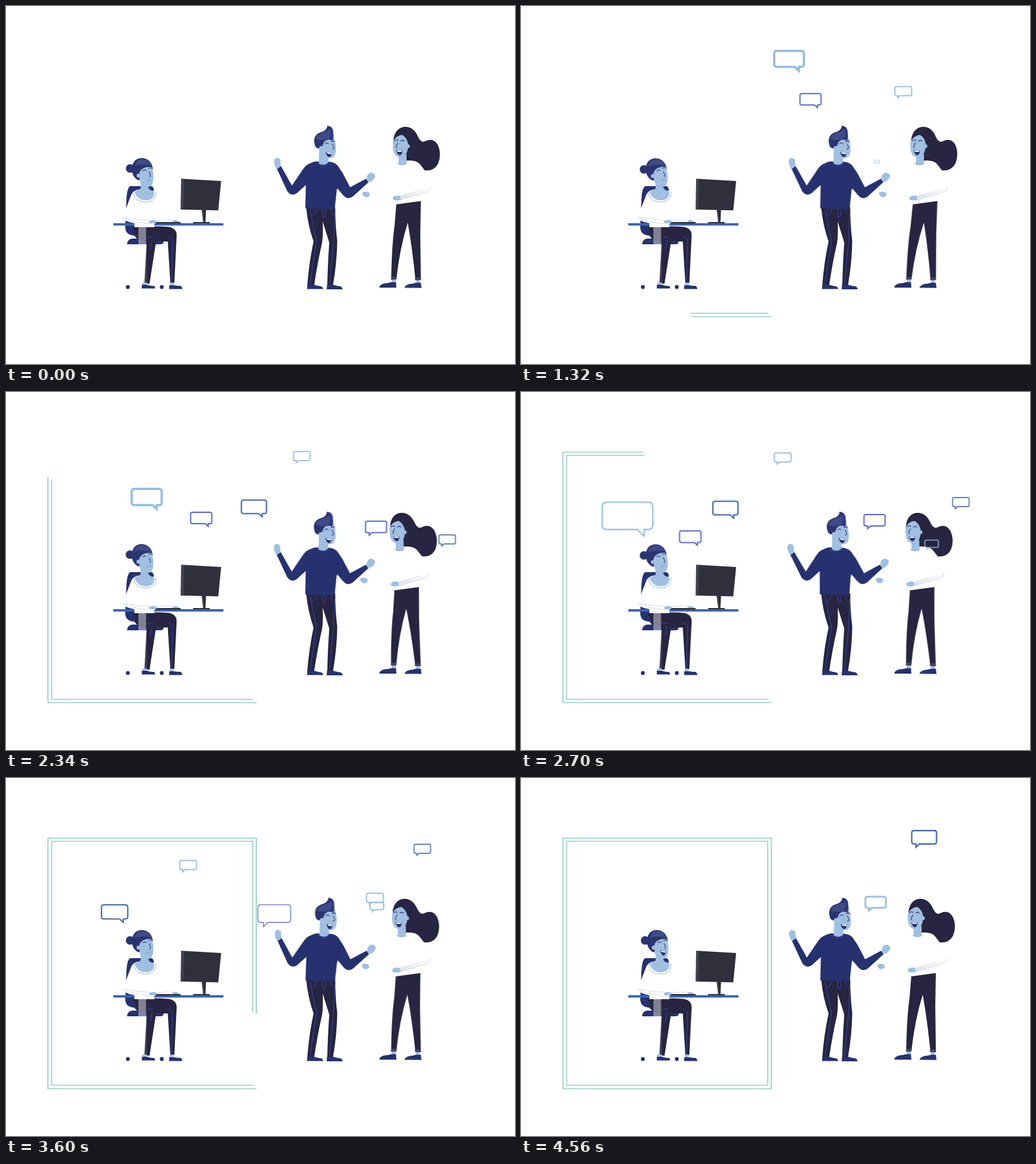
Write an HTML page that moves like this. It is 892 by 628 pixels and loops after 4800 ms.

```html
<!DOCTYPE html>
<html lang="en">
<head>
<meta charset="utf-8">
<title>Office chatter</title>
<style>
  html, body { margin: 0; width: 100%; height: 100%; overflow: hidden; background: #fff; }
  svg { display: block; width: 892px; height: 628px; }
  .skin { fill: #a0bfe1; }
  .navy { fill: #26326f; }
  .dark { fill: #272541; }
  .hair { fill: #2a3570; }
  .shine { fill: #3f4b86; }
  .white { fill: #fff; }
  .line { fill: none; stroke-linecap: round; stroke-linejoin: round; }
  .face { stroke: #29356f; stroke-width: 1.2; }
  .seam { stroke: #3747b4; stroke-width: 1; }
  .fold { stroke: #d3d7e2; stroke-width: 1; }
  .collar { stroke: #8fb0da; stroke-width: 1; }
  .border { fill: none; stroke: #5fb3ac; stroke-width: 1.1; stroke-dasharray: 1612 1700; animation: trace 4.8s linear infinite; }
  #bubbles path { fill: none; }

  #woman { transform-origin: 700px 490px; animation: lean 4.8s ease-out infinite; }
  #man { transform-origin: 552px 385px; animation: rock 4.8s ease-in-out infinite; }
  #head { transform-origin: 244px 320px; animation: nod 4.8s ease-in-out infinite; }
  #smile { animation: smile 4.8s linear infinite; }

  @keyframes trace {
    0% { stroke-dashoffset: 1612px; }
    21.25% { stroke-dashoffset: 1612px; animation-timing-function: steps(13); }
    37.5% { stroke-dashoffset: 1246px; animation-timing-function: steps(10); }
    50% { stroke-dashoffset: 806px; animation-timing-function: steps(13); }
    66.25% { stroke-dashoffset: 440px; animation-timing-function: steps(10); }
    78.75%, 100% { stroke-dashoffset: 0px; }
  }
  @keyframes lean {
    0%, 95%, 100% { transform: skewX(0deg); }
    17.5% { transform: skewX(-1.8deg); animation-timing-function: ease-in-out; }
    47.5% { transform: skewX(1.38deg); }
  }
  @keyframes rock {
    0%, 95%, 100% { transform: skewX(0deg); }
    17.5% { transform: skewX(1.2deg); }
    41.25% { transform: skewX(-1.2deg); }
    56.25% { transform: skewX(1.6deg); }
    75% { transform: skewX(-.6deg); }
  }
  @keyframes nod {
    0%, 17.5%, 75%, 100% { transform: rotate(0deg); }
    27.5%, 56.25% { transform: rotate(-3.4deg); }
    41.25% { transform: rotate(2.3deg); }
  }
  @keyframes smile { 0%, 80% { opacity: 0; } 82.5%, 100% { opacity: 1; } }
</style>
</head>
<body>
<svg viewBox="0 0 892 628">
  <defs>
    <linearGradient id="sleeve">
      <stop offset="0" stop-color="#dfe2ea"/>
      <stop offset="1" stop-color="#fff"/>
    </linearGradient>
  </defs>

  <path class="border" pathLength="1612" d="M439 545H73.500V105.500H438.500V545"/>
  <path class="border" pathLength="1612" d="M433 539H80V111H432.500V539"/>

  <!-- desk worker -->
  <g>
    <path class="navy" d="M218 316Q212 318 211 340L209 388Q209 402 226 403H250L259 324Q259 317 255 316Z"/>
    <path class="navy" d="M212 418Q213 409 221 408H276V415Q275 418 271 418Z"/>
    <rect x="188" y="381" width="193" height="4.200" fill="#3b65b0"/>
    <path class="dark" d="M222 389Q258 385 285 387.500Q300 390 299 404L295 486H288L283.500 413H263L251.500 487H242.500L246.500 413Q221 411 222 389Z"/>
    <path class="line seam" d="M247 406L258 405M256 411L253 428M284 405L291 408M229 404Q224 400 224 393M292 409L290 482"/>
    <path class="white" opacity=".42" d="M232 387H245.500V418H232Z"/>
    <path class="white" opacity=".12" d="M243 418H247V486H243Z"/>
    <path class="skin" d="M239 485H247V491H239ZM287 485H294V491H287Z"/>
    <path class="navy" d="M238 489H247Q252 491 259 491Q262 493 261 495.500H238ZM286 490H295Q300 491 306 491Q309 493 309 496.500H286Z"/>
    <circle class="navy" cx="213.5" cy="493" r="3.4"/>
    <circle class="navy" cx="273" cy="493" r="3.4"/>
    <path class="white" d="M232 322Q224 323 220 330L206 366Q204 376 216 379L225 381V388H260V382L268 376L263 345L264 325L257 324Z"/>
    <path class="white" stroke="#8fb0da" d="M223 326Q225 344 246 344Q264 343 263 325"/>
    <path class="skin" d="M225 325Q235 323 237 318H249Q252 324 260 325Q261 340 245 341Q229 340 225 325Z"/>
    <path class="line fold" d="M205 371Q216 379 256 382M206 370Q225 375 250 375.500M265 377Q280 374 294 376"/>
    <path class="skin" d="M250 378Q254 374 262 376Q267 379 264 381H252ZM291 378Q296 373 302 377Q305 380 302 381Z"/>
    <path d="M264 379H306V381.500H262Z" fill="#2c2b39"/>
    <g id="head">
      <path class="skin" d="M236 298H249V322Q243 326 236 322Z"/>
      <circle class="hair" cx="217.500" cy="285" r="7.5"/>
      <path class="hair" d="M221 291Q219 268 238 266.500Q255 268 257.500 286L240 296L233 306Q223 302 221 291Z"/>
      <path class="shine" d="M226 277Q232 267 241 268.500Q252 271 255 280Q240 276 226 280Z"/>
      <path class="skin" d="M234 291Q241 280 256 283Q258 289 258.500 300Q258 317 248 318Q236 317 234 305Z"/>
      <circle class="skin" cx="232.500" cy="297.500" r="3.6"/>
      <path class="line face" d="M240 289Q243 287 246 288M250 285Q253 283 256 285M251 291Q255 299 252 300"/>
      <path class="line" stroke="#6f91c0" d="M246 307Q249 305 253 306"/>
      <g id="smile">
        <path class="navy" d="M244 302L254 304Q253 312 249 311.500Q245 309 244 302Z"/>
        <path class="white" d="M245 302.500L253.500 304.500L253 306.500L246 305Z"/>
      </g>
    </g>
  </g>

  <!-- monitor -->
  <path d="M307 303L377 307L372 358.500L306 357Z" fill="#302f3c"/>
  <path d="M308 304L312 304.500L310.500 357H306.500Z" fill="#444350"/>
  <path d="M343 358H350.500L349.500 379H357V381H328V379H345.500Z" fill="#2b2a37"/>
  <path class="line" stroke="#555461" d="M345 360L347 378"/>

  <!-- standing man -->
  <path class="skin" d="M531 484H538V492H531ZM565 484H571V492H565Z"/>
  <path class="dark" d="M526 353H577Q577 385 580.500 412Q580 450 573 490H563Q564 450 566.500 415L555 378Q556 400 554 415Q546 450 540 490H528Q531 450 539 413Q529 385 526 353Z"/>
  <path class="line seam" d="M533 358L544 412L533 487M576 362L574 412L567 487M544 357Q543 368 534 367M555 357L556 370Q561 371 561 358M576 366Q570 367 569 358"/>
  <path class="navy" d="M528 489H540Q546 491 553 492Q556 494 556 496.500H527.500ZM562.500 489H573Q580 491 587 492Q590 494 590 497H562Z"/>
  <g id="man">
    <path class="skin" d="M475 287Q469 279 470 271Q472 265 477 267Q482 268 481 275L482 284ZM632 304Q632 294 640 292Q648 294 647 299Q645 306 637 309Z"/>
    <path class="navy" d="M533 276Q541 271 549 273Q557 278 566 273Q577 274 582 281L590 293L603 318L631 303L635.500 309L608 334Q599 341 591 332L580 319L576 357L524.500 355L525.500 314L510 328Q501 335 493 325L475 286L482 281L501 315L520 287Q526 278 533 276Z"/>
    <path class="line" stroke="#1f2a60" d="M582 290L580 322M526 314L528 300"/>
    <path class="skin" d="M549 248H565V274Q558 282 548 276Z"/>
    <path class="line seam" d="M546 276Q557 286 567 275"/>
    <path class="skin" d="M552 238Q560 230 575 231Q579 243 578 256Q576 268 567 267Q552 264 551 248Z"/>
    <path class="hair" d="M541 243Q536 225 556 220Q563 216 563 210Q574 211 573.500 223Q575 231 572 236Q563 232 557 239Q554 249 549 250Q542 250 541 243Z"/>
    <path class="shine" d="M543 233Q546 224 558 221Q566 219 568 215Q571 226 566 233Q556 237 543 233Z"/>
    <path class="line seam" d="M570 214Q574 225 571 233"/>
    <circle class="skin" cx="552" cy="249" r="3.3"/>
    <path class="line face" d="M559 242Q562 238 565 242M570 238Q573 235 576 238M572 242Q577 250 572 251"/>
    <path class="navy" d="M560.500 256L571 258Q570 266 565 265Q561 262 560.500 256Z"/>
    <path class="white" d="M562 256.500L570.500 258L570 260L563 259Z"/>
  </g>

  <!-- standing woman -->
  <path class="skin" d="M676 478H683V488H676ZM718.500 478H725V488H718.500Z"/>
  <g id="woman">
    <path class="dark" d="M679 238C679 222 688 212 700 212C713 212 719 222 723 231Q728 241 735 237Q749 230 757 244Q764 260 757 277Q749 291 732 288L714 276L700 272Z"/>
    <path class="dark" d="M684 347L727 342L726 400L727 480H717.500Q712 425 704 380Q690 425 684 480H675Q676 420 681 385Z"/>
    <path d="M675 475H685L684 480H674.500ZM716.500 476H727L727.500 481H717Z" fill="#45435e"/>
    <path class="white" d="M687 275L704 271Q719 270 725 277L735 290L746 314Q744 322 735 327L727.500 342L684 348L680 300Z"/>
    <path class="skin" d="M688 260H702V276Q695 281 688 277Z"/>
    <path class="line collar" d="M686 276Q694 282 703 276"/>
    <path class="skin" d="M678 238Q684 227 694 226Q703 231 705 243Q704 263 693 266Q679 265 678 249Z"/>
    <circle class="skin" cx="704.500" cy="246" r="3.2"/>
    <path class="line face" d="M681 237Q684 233 687 236M692 237Q695 234 698 237M687 240Q682 247 685 249"/>
    <path class="navy" d="M684 253L694.500 253Q695 261 690 262Q685 260 684 253Z"/>
    <path class="white" d="M685 253.500H694L693 256H686Z"/>
    <path d="M691 333Q715 325 744 317Q744 325 729 329L692 340Z" fill="url(#sleeve)"/>
    <path class="line fold" d="M744.500 317Q744 325 729 329L692 340"/>
    <path class="skin" d="M678 336Q681 331 691 333L692 340Q682 343 678 339ZM624 328Q628 324 636 327L638 331Q634 337 629 335Q625 333 624 328Z"/>
  </g>
  <path class="navy" d="M654 493Q657 486 669 486L675 484.500H683.500L684 493.500ZM698.500 493.500Q702 487 713 487L718 485.500H727L728 494Z"/>
  <path class="line" stroke="#1d2555" d="M655 493.500H684M699 494H728"/>

  <g id="bubbles"></g>
</svg>

<script>
const LOOP = 4800, STEP = 60, LAST = 4560, GROW = 300;
const layer = document.querySelector('#bubbles');
const clamp = v => Math.min(1, Math.max(0, v));

// Cubic curve through four stops evenly spaced in time.
function glide([a, b, c, d], u) {
  const v = 3 * u, p = v - 1, q = v - 2, r = v - 3;
  return (v * (3 * b * q * r - 3 * c * p * r + d * p * q) - a * p * q * r) / 6;
}

function outline(w) {
  const a = w / 2, b = w * .27, r = w * .09;
  return `M${r - a} ${-b}H${a - r}Q${a} ${-b} ${a} ${r - b}V${b - r}Q${a} ${b} ${a - r} ${b}H${w * .33}` +
    `V${b + w * .13}L${w * .19} ${b}H${r - a}Q${-a} ${b} ${-a} ${b - r}V${r - b}Q${-a} ${-b} ${r - a} ${-b}Z`;
}

// A bubble grows, glides and swells; then it bursts, unless it stays.
// The tail points right for dir 1 and left for -1.
function bubble(color, w, line, dir, [start, end], xs, ys, stays = false) {
  const el = document.createElementNS('http://www.w3.org/2000/svg', 'path');
  el.setAttribute('d', outline(w));
  el.setAttribute('stroke', color);
  layer.append(el);

  const pose = t => {
    const u = clamp((t - start) / (end - start));
    const swell = 1 + (stays ? .5 : 2.5) * u ** 24;
    const size = clamp((t - start) / GROW) * swell;
    return {
      transform: `translate(${glide(xs, u)}px, ${glide(ys, u)}px) scale(${size * dir}, ${size})`,
      strokeWidth: `${stays ? line : line / swell ** 2}px`,
      opacity: stays ? 1 : clamp((1 - u) * 20)
    };
  };
  const frames = [];
  for (let t = 0; t <= LAST; t += STEP) frames.push({ offset: t / LOOP, easing: 'step-end', ...pose(t) });
  frames.push({ offset: 1, ...pose(LAST) });
  el.animate(frames, { duration: LOOP, iterations: Infinity });
}

const pale = '#96bce2', violet = '#4c5dc8', blue = '#3c65a9';

bubble(pale, 52, 4, 1, [480, 2820], [665, 484, 306, 170], [115, 90, 153, 226]);
bubble(violet, 37, 2, 1, [600, 3180], [596, 485, 345, 264], [247, 163, 219, 282]);
bubble(blue, 44, 2.3, 1, [1260, 4020], [632, 468, 277, 139], [282, 204, 215, 249]);
bubble(pale, 29.5, 2, -1, [830, 4500], [720, 565, 366, 228], [192, 116, 134, 231]);
bubble(violet, 37, 2, -1, [1740, 3720], [658, 645, 573, 442], [278, 234, 223, 244]);
bubble(pale, 29.5, 2, -1, [2460, 4200], [739, 692, 645, 599], [281, 245, 209, 173]);
bubble(blue, 29, 1.6, -1, [1960, 4380], [758, 769, 731, 706.5], [363, 184, 125, 104], true);
bubble(pale, 24, 2, -1, [3240, 4380], [672, 649, 633, 621.5], [242, 224, 219, 218], true);
</script>
</body>
</html>
```
